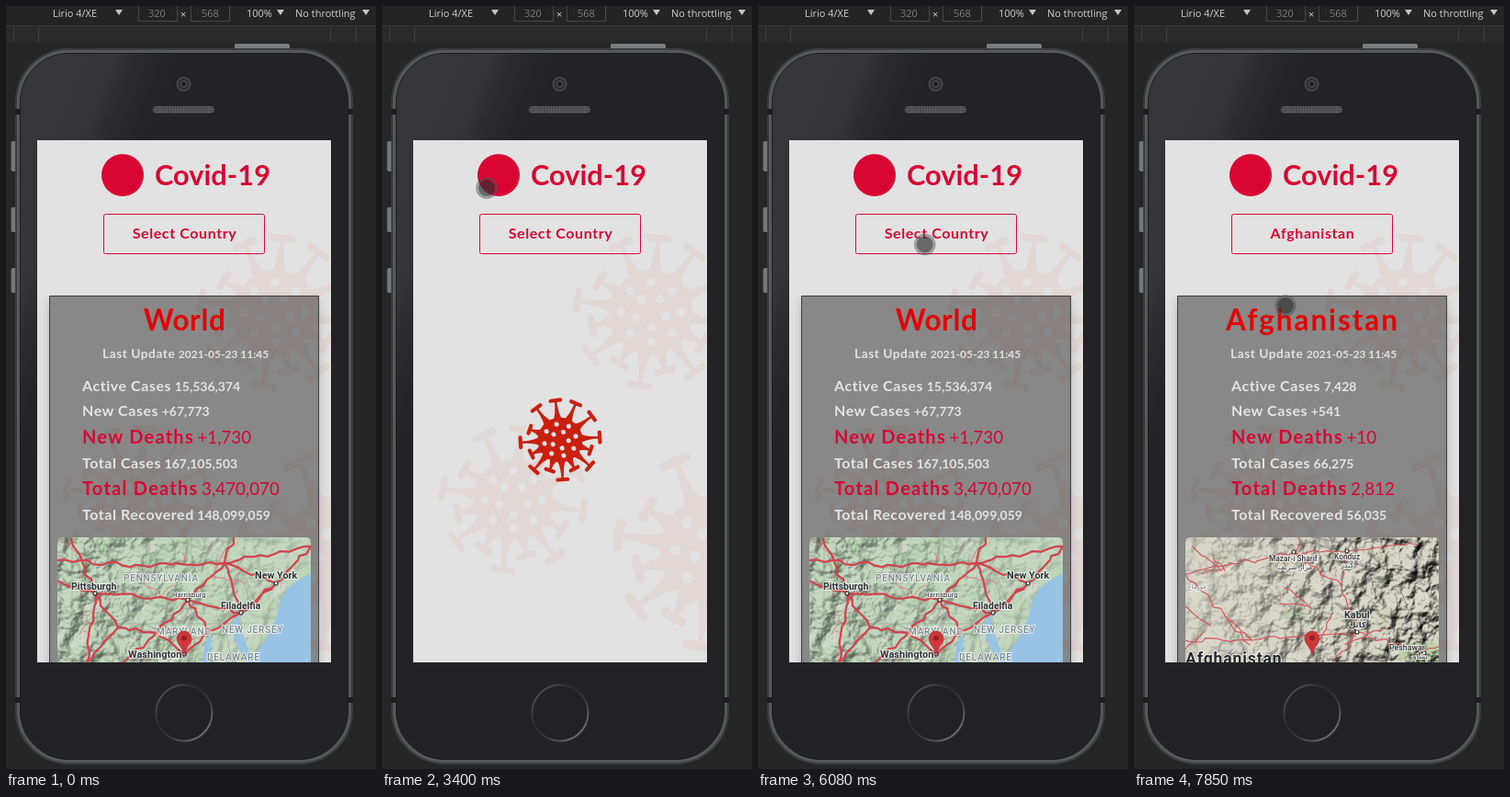
An HTML page for the animation above (8000 ms loop, 403 px wide and 830 px high).

```html
<!DOCTYPE html>
<html lang="en">
<head>
<meta charset="utf-8">
<title>Covid-19 dashboard</title>
<style>
html, body { margin: 0; width: 100%; height: 100%; overflow: hidden; background: #262626; }
svg { display: block; width: 403px; height: 830px; }
text { font-family: Lato, sans-serif; white-space: pre; }
.ui text { font-family: "Open Sans", sans-serif; font-size: 11px; fill: #d2d3d5; }
.ui .dim { fill: #7d7d7d; }
.map { isolation: isolate; }
.map text { font-family: Roboto, "DejaVu Sans", sans-serif; paint-order: stroke; stroke: #fff; stroke-opacity: .75; stroke-width: 2px; stroke-linejoin: round; }
.relief { mix-blend-mode: multiply; }
</style>
</head>
<body>
<svg id="stage" viewBox="0 0 403 830"></svg>
<script>
const LOOP = 8000;
const RED = '#d80532', PAPER = '#e2e2e2', STAIN = '#e1d7d5';

let seed = 11;
const rnd = () => (seed = (seed * 16807) % 2147483647) / 2147483647;
const spread = n => (rnd() - .5) * n;
const range = n => [...Array(n).keys()];

const label = (x, y, s, size, fill, o = {}) =>
  `<text x="${x}" y="${y}" font-size="${size}" fill="${fill}" font-weight="${o.w || 700}"` +
  ` letter-spacing="${o.ls || 0}" text-anchor="${o.mid ? 'middle' : 'start'}">${s}</text>`;
const value = (s, size, weight) =>
  `<tspan dx="3.5" font-size="${size}" font-weight="${weight}" letter-spacing="0">${s}</tspan>`;
const rect = (x, y, w, h, fill, rest = '') =>
  `<rect x="${x}" y="${y}" width="${w}" height="${h}" fill="${fill}" ${rest}/>`;
const dot = (x, y, r, fill, rest = '') => `<circle cx="${x}" cy="${y}" r="${r}" fill="${fill}" ${rest}/>`;
const tri = (x, y) => `<path d="M${x} ${y}h8l-4 6z" fill="#c4c5c7"/>`;

/* Virus of radius 100: long and short arms alternate below, four long ones on top */
function virus() {
  const limbs = range(14).map(i => {
    const low = i < 10, a = low ? 9 + 22.5 * i : 246 + 30 * (i - 10);
    const len = low && i % 2 ? 76 : 94, cap = len / 8;
    return `<g transform="rotate(${a})"><path d="M46 -12Q58 -3 ${len} -2.5V2.5Q58 3 46 12z"/>` +
      `<path d="M${len} ${-cap}V${cap}" stroke="currentColor" stroke-width="9" stroke-linecap="round"/></g>`;
  });
  const holes = range(13).map(i => {
    const a = i < 5 ? i * 1.257 + .3 : i * .785, r = i < 5 ? 20 : 38;
    return dot(r * Math.cos(a), r * Math.sin(a), 5.5, PAPER);
  });
  return `<g id="virus" fill="currentColor">${limbs.join('')}<circle r="53"/>${holes.join('')}</g>`;
}
const germ = (x, y, r, color) =>
  `<use href="#virus" transform="translate(${x} ${y}) scale(${r / 100})" color="${color}"/>`;

/* Roads: wobbly lines through named places */
function road(stops, wob) {
  let d = 'M' + stops[0];
  for (let i = 1; i < stops.length; i++) {
    const [a, b] = stops[i - 1], [u, v] = stops[i];
    const n = Math.ceil(Math.hypot(u - a, v - b) / 8);
    for (let k = 1; k <= n; k++) {
      const w = k < n ? wob : 0, p = k / n;
      d += `L${(a + (u - a) * p + spread(w)).toFixed(1)} ${(b + (v - b) * p + spread(w)).toFixed(1)}`;
    }
  }
  return d;
}
const routes = (places, list, wob) => list.map(s => road(s.split(' ').map(k => places[k]), wob)).join('');
const lanes = n => range(n).map(() => {
  const x = 56 + rnd() * 220, y = 578 + rnd() * 130;
  return road([[x, y], [x + spread(90), y + spread(70)]], 5);
}).join('');
const stroke = (d, color, width) =>
  `<path d="${d}" fill="none" stroke="${color}" stroke-width="${width}" stroke-linejoin="round"/>`;
const town = ([x, y]) => dot(x, y, 2, '#fff', 'stroke="#333" stroke-width="1.2"');
const relief = fade => `<g class="relief" mask="url(#${fade})">${rect(56, 578, 276, 136, '#fff', 'filter="url(#terrain)"')}</g>`;
const pin = '<path d="M194 706C193 698 186 694 186 688a8 8 0 0 1 16 0c0 6-7 10-8 18z" fill="#d0353a" stroke="#a82a2e" stroke-width=".6"/>' +
  dot(194, 687.5, 2.7, '#8e1f24');

function patches(n, colors) {
  return range(n).map(i => {
    const x = 56 + rnd() * 276, y = 578 + rnd() * 136;
    return `<ellipse rx="${4 + rnd() * 14}" ry="${3 + rnd() * 6}" transform="translate(${x} ${y}) rotate(-40)" fill="${colors[i % colors.length]}" opacity=".5"/>`;
  }).join('');
}

function worldMap() {
  const p = { pitt: [97, 639], york: [294, 628], harr: [198, 646], phil: [256, 660], wash: [194, 705],
    nw: [56, 603], n1: [70, 578], mid: [150, 609], hub: [238, 606], n2: [248, 578], ne: [332, 588],
    w: [56, 625], sw: [88, 714], s: [128, 714], bend: [122, 676], fred: [164, 682], balt: [222, 680] };
  const main = ['nw mid hub york', 'n1 pitt sw', 'w pitt harr phil york', 's fred harr hub n2',
    'wash balt phil york ne', 'pitt bend fred wash', 'harr balt', 'hub ne', 'sw bend', 'phil hub'];
  const c = '#2f3438', g = '#7b878e', city = { w: 600 }, state = { w: 500, ls: .8 };
  return rect(56, 578, 276, 136, '#c3d8bf') + patches(60, ['#b2cfb0', '#d6dcd1', '#bcd4b7']) + relief('fadeRight') +
    '<path d="M332 616L309 631 299 646 295 664 284 688 272 704 266 714H332z" fill="#98c3e4"/>' +
    '<path d="M256 658L246 672 250 692 262 714H270L260 690 254 674zM214 714L216 694 224 682 222 714z" fill="#98c3e4"/>' +
    '<path d="M300 626L332 606V616L308 630z" fill="#bdd5b5"/>' +
    stroke('M72 672H238L246 714M72 578V672M246 669L268 640 258 616 292 606', '#9aa59c', .7) +
    stroke(lanes(12), '#dc7d7d', 1) + stroke(routes(p, main, 5), '#d1444d', 2.3) +
    [p.pitt, p.york, p.phil, p.harr, p.wash].map(town).join('') +
    label(128, 626, 'PENNSYLVANIA', 10, g, state) + label(164, 684, 'MARYLAND', 10, g, state) +
    label(235, 682, 'NEW JERSEY', 10, g, state) + label(219, 712, 'DELAWARE', 10, g, state) +
    label(71, 635, 'Pittsburgh', 10.5, c, city) + label(271, 623, 'New York', 10.8, c, city) +
    label(181, 643, 'Harrisburg', 7.8, c, { w: 400 }) + label(234, 656, 'Filadelfia', 10.5, c, city) +
    label(133, 709, 'Washington', 11, c, city) + pin;
}

function afghanMap() {
  const p = { maz: [174, 594], kon: [232, 593], kab: [243, 681], pesh: [316, 704],
    w1: [56, 618], w2: [56, 690], ne: [310, 586], pass: [226, 630], n: [180, 578], s: [216, 714], e: [332, 697], b: [128, 690] };
  const main = ['w1 maz kon ne', 'kon pass kab', 'n maz pass', 'kab pesh e', 'kab s', 'w2 b kab', 'w1 b'];
  const c = '#34373a', t = { w: 500 };
  return rect(56, 578, 276, 136, '#d9d7ca') + patches(30, ['#cfd0ba', '#e2dfd2', '#d5d4cd']) +
    '<ellipse cx="312" cy="704" rx="24" ry="13" fill="#bed1a9"/><ellipse cx="172" cy="662" rx="12" ry="6" fill="#bfcdb3"/>' +
    relief('fadeLeft') + stroke('M196 578L226 584 262 578M322 578L290 634 300 660 272 714', '#8c8c86', .9) +
    stroke(lanes(10) + routes(p, main, 6), '#d2575a', 1.2) +
    [p.maz, p.kon, p.kab, p.pesh].map(town).join('') +
    label(147, 604, 'Mazar-i Sharif', 8.4, c, t) + label(156, 613, 'مزار شریف', 8, c, t) +
    label(218, 602, 'Konduz', 8.4, c, t) + label(225, 611, 'کندز', 8, c, t) + label(58, 634, 'غورماچ', 7, '#777', t) +
    label(229, 666, 'Kabul', 10.8, c) + label(234, 676, 'کابل', 8.5, c) +
    label(278, 701, 'Peshawar', 8.8, c, t) + label(300, 710, 'پشاور', 8, c, t) +
    label(56, 716, 'Afghanistan', 17.5, '#26282a', { w: 600, ls: .9 }) + pin;
}

const ROWS = ['Active Cases', 'New Cases', 'New Deaths', 'Total Cases', 'Total Deaths', 'Total Recovered'];
function stats(title, x, values, ls) {
  let y = 392;
  return label(194.5, 353, title, 31.5, '#e10505', { mid: 1, ls }) + ROWS.map((name, i) => {
    const big = name.endsWith('Deaths');
    y += big ? 29.5 : 27;
    return big ? label(x, y, name + value(values[i], 18.8, 400), 20, RED, { ls: 1.25 })
      : label(x, y, name + value(values[i], 14, 700), 16, '#e4e4e4', { ls: .55 });
  }).join('');
}

const COUNTRIES = ['Afghanistan', 'Albania', 'Algeria', 'American Samoa', 'Andorra', 'Angola', 'Anguilla',
  'Antigua and Barbuda', 'Argentina', 'Armenia', 'Aruba', 'Australia', 'Austria', 'Azerbaijan',
  'Bahamas', 'Bahrain', 'Bangladesh'];
const dropdown = rect(105, 272, 199, 580, '#000', 'opacity=".5" filter="url(#soft)"') +
  rect(106, 270, 197, 570, '#8b8b8b') + rect(107, 271, 195, 570, '#fff') +
  rect(107, 271, 180, 32, '#ade0f6') + rect(287, 271, 15, 570, '#f6f6f6') + rect(287, 271, 13, 54, '#c9c9c9') +
  label(113, 291.5, 'Select Country', 15.6, '#fff', { ls: .1 }) +
  COUNTRIES.map((c, i) => label(113, 323.5 + 32 * i, c, 16, '#e4083f', { w: 400, ls: .55 })).join('');

const toolbar = `<g class="ui">${rect(0, 0, 403, 21, '#242424')}${rect(0, 21, 403, 1, '#3a3a3a')}${rect(0, 22, 403, 17, '#2b2b2b')}
  ${[8, 35, 353, 381].map(x => rect(x, 23, 1, 16, '#414141')).join('')}
  ${[144.5, 201.5].map(x => rect(x, -3.5, 42, 20, '#222', 'stroke="#484848"')).join('')}
  <text x="51" y="12">Lirio 4/XE</text><text x="155" y="12" class="dim">320</text><text x="190" y="13">×</text>
  <text x="213" y="12" class="dim">568</text><text x="262" y="12">100%</text><text x="315" y="12">No throttling</text>
  ${tri(119, 4)}${tri(295, 4)}${tri(388, 4)}</g>`;

const phone = rect(249, 41, 60, 8, '#7c7d7f', 'rx="2"') +
  [147, 219, 285].map((y, i) => rect(5.5, y, 7, i ? 27 : 33, '#757678', 'rx="2"')).join('') +
  rect(10, 46, 368, 779, '#3c3d3f', 'rx="58"') +
  rect(13.5, 49.5, 361, 772, '#1b1b1c', 'rx="55" stroke="#56595c" stroke-width="3"') +
  [112, 752].map(y => rect(10, y, 6, 6, '#1d1d1e') + rect(372, y, 6, 6, '#1d1d1e')).join('') +
  rect(16, 52, 356, 767, '#232325', 'rx="52"') + rect(16, 52, 356, 767, 'url(#gloss)', 'rx="52"') +
  dot(193.5, 85, 8, '#454548') + dot(193.5, 85, 6, '#2a2a2c') + dot(193.5, 85, 4, '#4b4b4f') + dot(193.5, 85, 2.6, '#202024') +
  rect(160, 109, 67, 7.5, 'url(#mesh)', 'rx="3.7"') +
  dot(194, 769, 30.5, '#222224', 'stroke="url(#ring)" stroke-width="2"');

document.getElementById('stage').innerHTML = `
<defs>
  ${virus()}
  <linearGradient id="gloss" gradientUnits="userSpaceOnUse" x1="16" y1="90" x2="170" y2="150">
    <stop stop-color="#38383a"/><stop offset=".5" stop-color="#343436"/><stop offset="1" stop-color="#232325" stop-opacity="0"/>
  </linearGradient>
  <linearGradient id="ring" x1="0" y1="0" x2="1" y2="1">
    <stop stop-color="#5c5c5e"/><stop offset=".4" stop-color="#2a2a2c"/><stop offset=".6" stop-color="#38383a"/><stop offset="1" stop-color="#8b8b8d"/>
  </linearGradient>
  <linearGradient id="fade"><stop offset=".1" stop-color="#fff"/><stop offset="1" stop-color="#333"/></linearGradient>
  <mask id="fadeRight">${rect(56, 578, 276, 136, 'url(#fade)', 'opacity=".55"')}</mask>
  <mask id="fadeLeft">${rect(56, 578, 276, 136, 'url(#fade)', 'transform="matrix(-1 0 0 1 388 0)"')}</mask>
  <pattern id="mesh" width="3" height="3" patternUnits="userSpaceOnUse">${rect(0, 0, 3, 3, '#4a4a4c')}${dot(1.5, 1.5, .8, '#6c6c6e')}</pattern>
  <filter id="soft" x="-20%" y="-10%" width="140%" height="120%"><feGaussianBlur stdDeviation="6"/></filter>
  <filter id="terrain" x="0" y="0" width="1" height="1" color-interpolation-filters="sRGB">
    <feTurbulence type="fractalNoise" baseFrequency=".045" numOctaves="4" seed="4"/>
    <feDiffuseLighting surfaceScale="13" diffuseConstant="1.15" lighting-color="#f6f6f2"><feDistantLight azimuth="225" elevation="58"/></feDiffuseLighting>
  </filter>
  <clipPath id="screen"><rect x="34" y="146" width="320" height="568"/></clipPath>
  <clipPath id="around"><path d="M34 146H354V714H34zM47 315V714H341V315z" clip-rule="evenodd"/></clipPath>
  <clipPath id="mapbox"><rect x="56" y="578" width="276" height="150" rx="5"/></clipPath>
</defs>
${rect(0, 0, 403, 830, '#262626')}${toolbar}${phone}
<g clip-path="url(#screen)">
  ${rect(34, 146, 320, 568, PAPER)}
  ${germ(293, 333, 86, STAIN)}${germ(143, 537, 82, STAIN)}${germ(362, 592, 112, STAIN)}
  ${dot(127, 184, 23, RED)}
  ${label(162, 194.5, 'Covid-19', 30.8, RED)}
  ${rect(106.5, 226.5, 175, 43, 'none', `rx="2" stroke="${RED}"`)}
  <text id="choice" x="194.5" y="252.5" font-size="16" font-weight="700" letter-spacing=".6" text-anchor="middle" fill="${RED}"></text>
  <g id="card">
    <g clip-path="url(#around)">${rect(47, 322, 294, 420, '#000', 'opacity=".2" filter="url(#soft)"')}</g>
    ${rect(47.5, 315.5, 293, 420, '#000', 'fill-opacity=".4" stroke="#3a3a3a"')}
    ${label(105, 383, 'Last Update' + value('2021-05-23 11:45', 12, 700), 13.8, PAPER, { ls: .5 })}
    <g id="world">${stats('World', 83, ['15,536,374', '+67,773', '+1,730', '167,105,503', '3,470,070', '148,099,059'], .6)}</g>
    <g id="afghan">${stats('Afghanistan', 106, ['7,428', '+541', '+10', '66,275', '2,812', '56,035'], 1.9)}</g>
    <g class="map" clip-path="url(#mapbox)"><g id="mapA">${worldMap()}</g><g id="mapB">${afghanMap()}</g></g>
  </g>
  <g id="spinner">${germ(0, 0, 46, '#c9200f')}</g>
</g>
<g id="list">${dropdown}</g>
<g id="touch">${dot(0, 0, 11.2, '#505050', 'fill-opacity=".4" stroke="#5a5a5a" stroke-opacity=".35" stroke-width="1.4"')}${dot(0, 0, 9, '#1c1c1c', 'fill-opacity=".45"')}</g>
<path id="arrow" d="M.5 .5V16.2L4.1 12.8 6.7 18.8 9.2 17.7 6.6 11.8H11.5z" fill="#fff" stroke="#111"/>`;

const $ = id => document.getElementById(id);
const show = (id, on) => { $(id).style.display = on ? '' : 'none'; };
const place = (id, [x, y], extra = '') => $(id).setAttribute('transform', `translate(${x} ${y})${extra}`);

const ENTER = 1330, LOAD = 2340, READY = 3470, OPEN = 6200, CLOSE = 7280, DATA = 7500, MAP = 7640;
const PICK = [165, 326];

/* Stops of the pointer: [time, x, y] */
const TOUCH = [[ENTER, 29, 256], [2010, 133, 240], [2160, 155, 245], [LOAD, 155, 245], [3400, 114, 198],
  [4010, 114, 211], [4480, 170, 533], [4770, 199, 543], [5000, 216, 527], [5590, 197, 315], [OPEN, 178, 246]];
const ARROW = [[OPEN, 176, 262], [6680, ...PICK]];
function along(keys, t) {
  const i = keys.findIndex(k => k[0] > t);
  if (i < 1) return keys.at(i).slice(1);
  const [a, x, y] = keys[i - 1], [b, u, v] = keys[i], p = (t - a) / (b - a);
  return [x + (u - x) * p, y + (v - y) * p];
}

function draw(t) {
  const loading = t >= LOAD && t < READY, open = t >= OPEN && t < CLOSE;
  show('card', !loading);
  show('spinner', loading);
  place('spinner', [194, 472], ` rotate(${(t - LOAD) * 360 / 1100})`);
  show('world', t < DATA);
  show('afghan', t >= DATA);
  show('mapA', t < MAP);
  show('mapB', t >= MAP);
  $('choice').textContent = t < CLOSE ? 'Select Country' : 'Afghanistan';
  show('list', open);
  show('arrow', open);
  place('arrow', along(ARROW, t));
  show('touch', t >= ENTER && !open);
  place('touch', t < CLOSE ? along(TOUCH, t) : PICK);
}

function tick() {
  draw(performance.now() % LOOP);
  requestAnimationFrame(tick);
}
tick();
</script>
</body>
</html>
```
